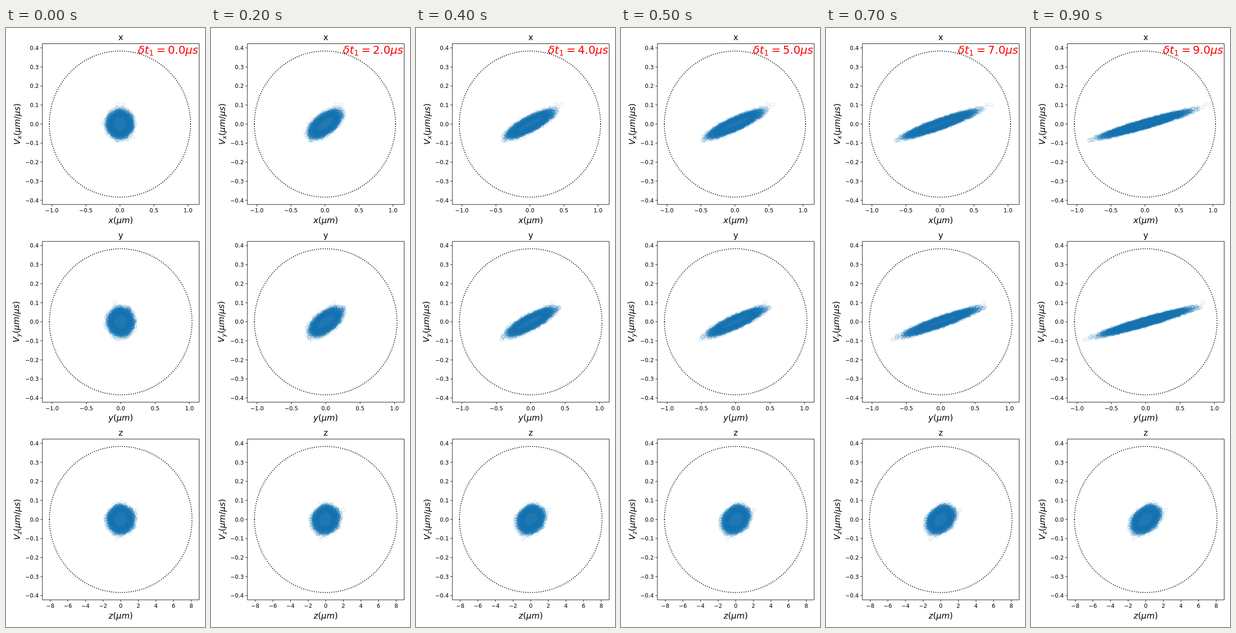
Write an HTML page with a canvas that moves like this. It is 427 by 1280 pixels and loops after 1000 ms.

```html
<!DOCTYPE html>
<html lang="en">
<head>
<meta charset="utf-8">
<title>Phase space expansion</title>
<style>
  html, body { margin: 0; width: 100%; height: 100%; overflow: hidden; background: #fff; }
  svg, canvas { position: absolute; left: 0; top: 0; width: 427px; height: 1280px; }
  text { font-family: "DejaVu Sans", sans-serif; font-size: 11.86px; white-space: pre; }
  .mid { text-anchor: middle; }
  .end { text-anchor: end; }
  .label { font-size: 17.8px; text-anchor: middle; }
  .time { font-size: 23.7px; fill: #f00; }
  .i { font-style: italic; }
  .sub { font-size: 70%; }
  .axis { fill: none; stroke: #000; stroke-width: .95; }
  .dots { fill: none; stroke: #000; stroke-width: 1.78; stroke-dasharray: 1.78 2.94; }
</style>
</head>
<body>
<svg id="plot" viewBox="0 0 427 1280"></svg>
<canvas id="cloud" width="427" height="1280"></canvas>
<script>
const BOX = { left: 78, right: 414.5, half: 171.8 };
const V_UNIT = 407, STEP_MS = 100, STEPS = 10;
const COUNT = 20000, SIGMA_X = 9.2, SIGMA_V = 9.8, CORE = 2.2, LIMIT = 3.75, MARKER = 3.55;

// unit: pixels per µm; far: stray particles as pixel offsets [x, v] at time zero
const panels = [
  { name: 'x', cx: 244.5, cy: 205.3, rx: 151.5, unit: 146, tick: .5, n: 2, digits: 1, labelX: 30,
    far: [[-5.5, 42.3], [6.5, 41.5], [7, 36.5], [-5.5, -35.3], [28, -27.5], [-37, 0]] },
  { name: 'y', cx: 246.2, cy: 627.8, rx: 153, unit: 147.4, tick: .5, n: 2, digits: 1, labelX: 27.5,
    far: [[-11.5, 41], [15, 32], [-6, -38.5], [-9, -36], [-3, -36], [-35, -3]] },
  { name: 'z', cx: 246.2, cy: 1050.2, rx: 153, unit: 18.9, tick: 2, n: 4, digits: 0, labelX: 30,
    far: [[-9, -41.8], [35, 20.5], [2, 37], [-33, 0], [5, -36]] }
];

const it = s => `<tspan class="i">${s}</tspan>`;
const number = (v, d) => (v < 0 ? '−' : '') + Math.abs(v).toFixed(d);
const text = (cls, x, y, s, extra = '') => `<text class="${cls}" x="${x}" y="${y}" ${extra}>${s}</text>`;

function axes({ name, cx, cy, rx, unit, tick, n, digits, labelX }) {
  const { left, right, half } = BOX, top = cy - half, bottom = cy + half, mid = (left + right) / 2;
  const ry = 156.1;
  let path = `M${left} ${top}H${right}V${bottom}H${left}Z`, out = '';
  for (let k = -n; k <= n; k++) {
    const x = cx + k * tick * unit;
    path += `M${x} ${bottom}v4.15`;
    out += text('mid', x, bottom + 17.3, number(k * tick, digits));
  }
  for (let k = -4; k <= 4; k++) {
    const y = cy - k * V_UNIT / 10;
    path += `M${left} ${y}h-4.15`;
    out += text('end', left - 7.8, y + 4.4, number(k / 10, 1));
  }
  out += `<path class="axis" d="${path}"/>`;
  for (const sweep of [0, 1])
    out += `<path class="dots" d="M${cx - rx} ${cy}A${rx} ${ry} 0 0 ${sweep} ${cx + rx} ${cy}"/>`;
  out += text('label', mid, top - 7.1, name);
  out += text('label', mid, bottom + 39.7, `${it(name)}(${it('μm')})`);
  out += text('label', 0, 0,
    `${it('V')}<tspan class="i sub" dy="3">${name}</tspan><tspan dy="-3">(</tspan>${it('μm')}/${it('μs')})`,
    `transform="translate(${labelX} ${cy}) rotate(-90)"`);
  return out;
}

document.getElementById('plot').innerHTML = panels.map(axes).join('') +
  text('time', 283, 55, `${it('δt')}<tspan class="sub" dy="3.8">1</tspan>` +
    `<tspan dx="5.4" dy="-3.8">=</tspan><tspan id="clock" dx="4.7">0.0</tspan>${it('μs')}`);

function random(seed) {
  return () => {
    seed = seed + 0x6D2B79F5 | 0;
    let t = Math.imul(seed ^ seed >>> 15, 1 | seed);
    t = t + Math.imul(t ^ t >>> 7, 61 | t) ^ t;
    return ((t ^ t >>> 14) >>> 0) / 4294967296;
  };
}

// Normal cloud; the saturated centre is painted as one shape, so only its rim is kept
panels.forEach((p, k) => {
  const rnd = random(17 + k);
  p.points = p.far.slice();
  for (let j = 0; j < COUNT; j++) {
    const r = Math.sqrt(-2 * Math.log(1 - rnd())), a = rnd() * 2 * Math.PI;
    if (r > CORE - .3 && r < LIMIT)
      p.points.push([r * Math.cos(a) * SIGMA_X, r * Math.sin(a) * SIGMA_V]);
  }
});

const canvas = document.getElementById('cloud');
const ctx = canvas.getContext('2d');
const clock = document.getElementById('clock');

function draw(step) {
  ctx.clearRect(0, 0, canvas.width, canvas.height);
  ctx.fillStyle = ctx.strokeStyle = '#1f77b4';
  for (const { cx, cy, unit, points } of panels) {
    const shear = step * unit / V_UNIT;
    ctx.save();
    ctx.transform(1, 0, -shear, 1, cx, cy);
    ctx.beginPath();
    ctx.ellipse(0, 0, CORE * SIGMA_X, CORE * SIGMA_V, 0, 0, 2 * Math.PI);
    ctx.restore();
    // markers keep their shape, so the core grows by an even margin
    ctx.lineWidth = 2 * MARKER - 1;
    ctx.fill();
    ctx.stroke();
    ctx.lineWidth = 1.18;
    ctx.globalAlpha = .2;
    for (const [x, v] of points) {
      ctx.beginPath();
      ctx.arc(cx + x + shear * v, cy - v, MARKER, 0, 2 * Math.PI);
      ctx.stroke();
    }
    ctx.globalAlpha = 1;
  }
  clock.textContent = step.toFixed(1);
}

const start = performance.now();
let shown = -1;
function tick() {
  const step = Math.floor((performance.now() - start) / STEP_MS) % STEPS;
  if (step !== shown) draw(shown = step);
  requestAnimationFrame(tick);
}
tick();
</script>
</body>
</html>
```
